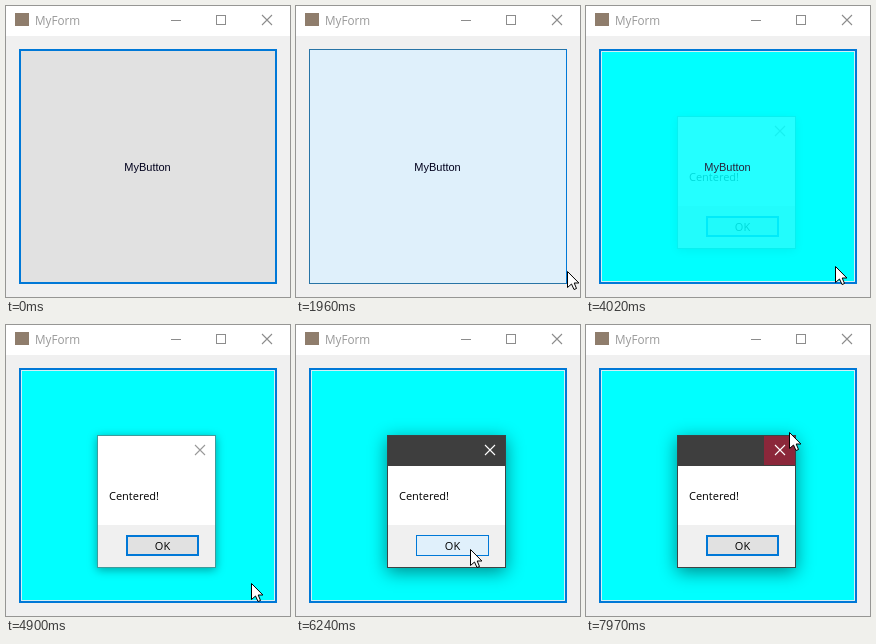
These frames come from a looping animation (284 by 291 pixels, 8000 ms). An HTML page with a canvas:

```html
<!DOCTYPE html>
<html lang="en">
<head>
<meta charset="utf-8">
<title>MyForm</title>
<style>
html, body { margin: 0; width: 100%; height: 100%; overflow: hidden; background: #f0f0f0; }
canvas { display: block; width: 284px; height: 291px; }
</style>
</head>
<body>
<canvas id="stage" width="284" height="291"></canvas>
<script>
const W = 284, H = 291, LOOP = 8000;
const BLUE = '#0078d7';
const UI_FONT = '"Open Sans", "Noto Sans", sans-serif';
const BUTTON_FONT = '11px "Liberation Sans", Arial, sans-serif';

const stage = document.getElementById('stage').getContext('2d');
const layer = document.createElement('canvas');
layer.width = W;
layer.height = H;
const sheet = layer.getContext('2d');

// Pointer path: time, x, y of the tip
const PATH = [
  [860, 284, 289], [1100, 279, 281], [1440, 275, 267],
  [1620, 275, 267], [1960, 271, 265], [2380, 257, 270],
  [2440, 257, 270], [2620, 251, 270],
  [3170, 251, 270], [3740, 252, 262],
  [3920, 252, 262], [4160, 245, 258],
  [4900, 245, 258], [5280, 208, 238], [5660, 174, 224],
  [6240, 174, 224], [6400, 177, 223],
  [7750, 177, 223], [7860, 192, 163], [7970, 203, 107]
];

const clamp = v => Math.max(0, Math.min(1, v));
const ramp = (t, a, b) => clamp((t - a) / (b - a));
const easeOut = p => 1 - (1 - p) * (1 - p);
const during = (t, a, b) => t >= a && t < b;

function mix(a, b, p) {
  const part = (hex, i) => parseInt(hex.slice(1 + 2 * i, 3 + 2 * i), 16);
  const c = [0, 1, 2].map(i => Math.round(part(a, i) + (part(b, i) - part(a, i)) * p));
  return `rgb(${c.join(',')})`;
}

function rect(g, x, y, w, h, color) {
  g.fillStyle = color;
  g.fillRect(x, y, w, h);
}

function framed(g, x, y, w, h, border, fill, size) {
  rect(g, x, y, w, h, border);
  rect(g, x + size, y + size, w - 2 * size, h - 2 * size, fill);
}

function text(g, str, x, y, font, color, align = 'left') {
  g.font = font;
  g.textAlign = align;
  g.fillStyle = color;
  g.fillText(str, x, y);
}

function cross(g, x, y, color) {
  g.strokeStyle = color;
  g.lineWidth = 1.1;
  g.beginPath();
  g.moveTo(x - 5, y - 5);
  g.lineTo(x + 5, y + 5);
  g.moveTo(x + 5, y - 5);
  g.lineTo(x - 5, y + 5);
  g.stroke();
}

function drawWindow(g) {
  rect(g, 0, 0, W, H, '#f0f0f0');
  rect(g, 0, 0, W, 30, '#ffffff');
  rect(g, 9, 7, 14, 13, '#8f7d6c');
  text(g, 'MyForm', 29, 19, '11.7px ' + UI_FONT, '#999999');
  rect(g, 165, 14, 10, 1, '#8c8c8c');
  framed(g, 210, 9, 10, 10, '#8c8c8c', '#ffffff', 1);
  cross(g, 261, 14, '#8c8c8c');
}

function drawButton(g, t) {
  const x = 13, y = 43, w = 258, h = 235;
  const cyan = t >= 4000;
  const pressed = during(t, 3880, 4000) || during(t, 6830, 6960);
  const hover = ramp(t, 1640, 1900);
  if (cyan) {
    framed(g, x, y, w, h, pressed ? '#005499' : BLUE, pressed ? '#cce4f7' : '#d4eef6', pressed ? 1 : 2);
    rect(g, x + 3, y + 3, w - 6, h - 6, '#00ffff');
  } else if (pressed) {
    framed(g, x, y, w, h, '#005499', '#cce4f7', 1);
  } else {
    const fill = mix('#e1e1e1', '#dff0fb', hover);
    framed(g, x, y, w, h, BLUE, fill, 1);
    if (hover < 1) {
      g.globalAlpha = 1 - hover;
      framed(g, x, y, w, h, BLUE, fill, 2);
      g.globalAlpha = 1;
    } else {
      rect(g, x, y, w - 1, 1, '#2874a6');
      rect(g, x, y, 1, h, '#2874a6');
      rect(g, x, y + h - 1, w - 1, 1, '#2874a6');
    }
  }
  text(g, 'MyButton', 141.5, 165, BUTTON_FONT, '#00001c', 'center');
}

function drawOk(g, t) {
  const hover = t < 6600
    ? ramp(t, 5440, 5640)
    : ramp(t, 7140, 7210) * (1 - ramp(t, 7770, 7900));
  const pressed = during(t, 6340, 6430);
  const fill = pressed ? '#cce4f7' : mix('#e1e1e1', '#e0f0fb', hover);
  framed(g, 120, 210, 73, 21, pressed ? '#005499' : BLUE, fill, 1);
  if (hover < 1 && !pressed) {
    g.globalAlpha = 1 - hover;
    framed(g, 120, 210, 73, 21, BLUE, fill, 2);
    g.globalAlpha = 1;
  }
  text(g, 'OK', 156.5, 225, '11px ' + UI_FONT, '#000000', 'center');
}

function drawDialog(g, t) {
  const active = ramp(t, 5800, 5960);
  g.clearRect(0, 0, W, H);
  g.save();
  g.shadowColor = `rgba(0,0,0,${0.36 + 0.1 * active})`;
  g.shadowBlur = 9 + 8 * active;
  g.shadowOffsetY = 2 + 2 * active;
  rect(g, 91, 110, 119, 133, mix('#3d9c9c', '#3c4444', active));
  g.restore();
  rect(g, 92, 111, 117, 30, mix('#ffffff', '#3e3e3e', active));
  rect(g, 92, 141, 117, 59, '#ffffff');
  rect(g, 92, 200, 117, 42, '#f0f0f0');
  const closeHover = ramp(t, 7890, 8010);
  if (closeHover > 0) rect(g, 178, 111, 31, 29, mix('#3e3e3e', '#b01c38', closeHover));
  cross(g, 194, 125, mix('#999999', '#ffffff', active));
  text(g, 'Centered!', 103, 175, '11px ' + UI_FONT, '#000000');
  drawOk(g, t);
}

function dialogAlpha(t) {
  if (t < 6600) return easeOut(ramp(t, 4010, 4160)) * (1 - ramp(t, 6430, 6510));
  return easeOut(ramp(t, 6980, 7210));
}

function pointerAt(t) {
  for (let i = 1; i < PATH.length; i++) {
    const [t0, x0, y0] = PATH[i - 1], [t1, x1, y1] = PATH[i];
    if (t < t1) {
      const p = ramp(t, t0, t1);
      return [Math.round(x0 + (x1 - x0) * p), Math.round(y0 + (y1 - y0) * p)];
    }
  }
  return PATH[PATH.length - 1].slice(1);
}

function drawPointer(g, t) {
  if (t < PATH[0][0]) return;
  const [x, y] = pointerAt(t);
  g.save();
  g.translate(x + 0.5, y + 0.5);
  g.beginPath();
  [[0, 0], [0, 16], [4, 12.5], [6.5, 18], [9, 17], [6.7, 11.5], [11.4, 11.5]]
    .forEach(([px, py]) => g.lineTo(px, py));
  g.closePath();
  g.fillStyle = '#ffffff';
  g.fill();
  g.strokeStyle = '#000000';
  g.lineWidth = 1;
  g.stroke();
  g.restore();
}

function draw(t) {
  drawWindow(stage);
  drawButton(stage, t);
  const alpha = dialogAlpha(t);
  if (alpha > 0) {
    drawDialog(sheet, t);
    stage.globalAlpha = alpha;
    stage.drawImage(layer, 0, 0);
    stage.globalAlpha = 1;
  }
  drawPointer(stage, t);
}

const start = performance.now();
function tick() {
  draw((performance.now() - start) % LOOP);
  requestAnimationFrame(tick);
}
tick();
</script>
</body>
</html>
```
